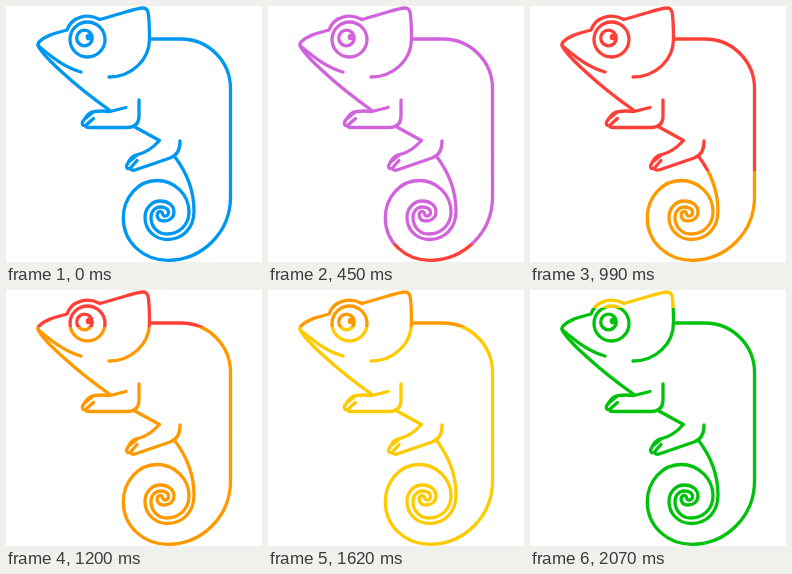
Recreate the animation shown at these times as an HTML page. Size 256 by 256 pixels, loop 2100 ms.

```html
<!DOCTYPE html>
<html lang="en">
<head>
<meta charset="utf-8">
<title>Chameleon</title>
<style>
html, body { margin: 0; height: 100%; overflow: hidden; background: #fff; }
svg { display: block; width: 100%; height: 100%; }
</style>
</head>
<body>
<svg viewBox="0 0 256 256">
  <defs>
    <linearGradient id="skin" gradientUnits="userSpaceOnUse" x1="0" y1="0" x2="0" y2="256">
      <stop/><stop/>
    </linearGradient>
  </defs>
  <g fill="none" stroke="url(#skin)" stroke-width="3.3" stroke-linecap="round" stroke-linejoin="round">
    <!-- head -->
    <path d="M75 66C60 62 48 53 33 40.500Q31 38.500 33 36C40 29 50 27 61 24C66 10 82 7 94 13.500L118 6.500C128 3.500 134 2 137 2Q142 2 142.500 9Q143.500 18 143.500 33C143.500 54 125.400 71 103 71"/>
    <path d="M32 39C34 47 66 78 104 104.500"/>
    <circle cx="81.500" cy="33.500" r="17.500"/>
    <circle cx="78.500" cy="32" r="7.800"/>
    <circle cx="83" cy="31" r="1.700"/>
    <!-- front leg -->
    <path d="M120 101.500L104 105.500Q96 104.500 89 105.500C82 106 80 111 76.500 116Q75.500 120 79.500 119.500L87.500 112.500M79.500 119.500Q80 121.500 83 121.500H121Q133 121.500 133 110V94"/>
    <path d="M80 112L86 107"/>
    <!-- hind leg -->
    <path d="M128 120.500L153.500 134.500Q143 146 132 148.500C125 149.500 123 155 120.500 160Q120.500 163.500 124 162.500L131 154.500M124 162.500Q126 165 129 164L164 152Q174.500 148 174 135"/>
    <path d="M124 155L130 150"/>
    <!-- back and coiled tail -->
    <path d="M143.500 33H175C202.300 33 224.500 55.200 224.500 82.500V191C224.500 226 196.500 254.300 162 254.300C137 254.300 117.300 236 117.300 212C117.300 191 132.500 174.500 151 174.500C169 174.500 183 189 183 206C183 219 173 228 161 228C152 228 145 221 145 211.500C145 205.500 149 201 154.500 201C159 201 162.500 203 162.500 206.500C162.500 209 160.500 210.500 158 210C155.500 209 157.500 206 155 205.500C149 205 150 215 158 215C164 215 168 211 168 206C168 199.500 162 195 154.500 195C145.500 195 139 202.500 139 211.500C139 224 149 233.500 161 233.500C177 233.500 188 222 188 205C188 185 181 167 169 151"/>
  </g>
</svg>
<script>
const colors = ['#0097f0', '#d163dc', '#ff4038', '#ff9900', '#ffca00', '#00c10c'];
const stops = document.querySelectorAll('stop');
const STEP = 30, STEPS = 14, LOOP = STEP * STEPS * (colors.length - 1);
const start = performance.now();

// Each colour rises from the bottom edge and replaces the one before it.
function draw(now) {
  const step = Math.floor(Math.max(0, now - start) % LOOP / STEP);
  const phase = Math.floor(step / STEPS);
  const edge = 1 - step % STEPS / STEPS;
  stops.forEach((stop, i) => {
    stop.setAttribute('offset', edge);
    stop.setAttribute('stop-color', colors[phase + i]);
  });
  requestAnimationFrame(draw);
}
draw(start);
</script>
</body>
</html>
```
